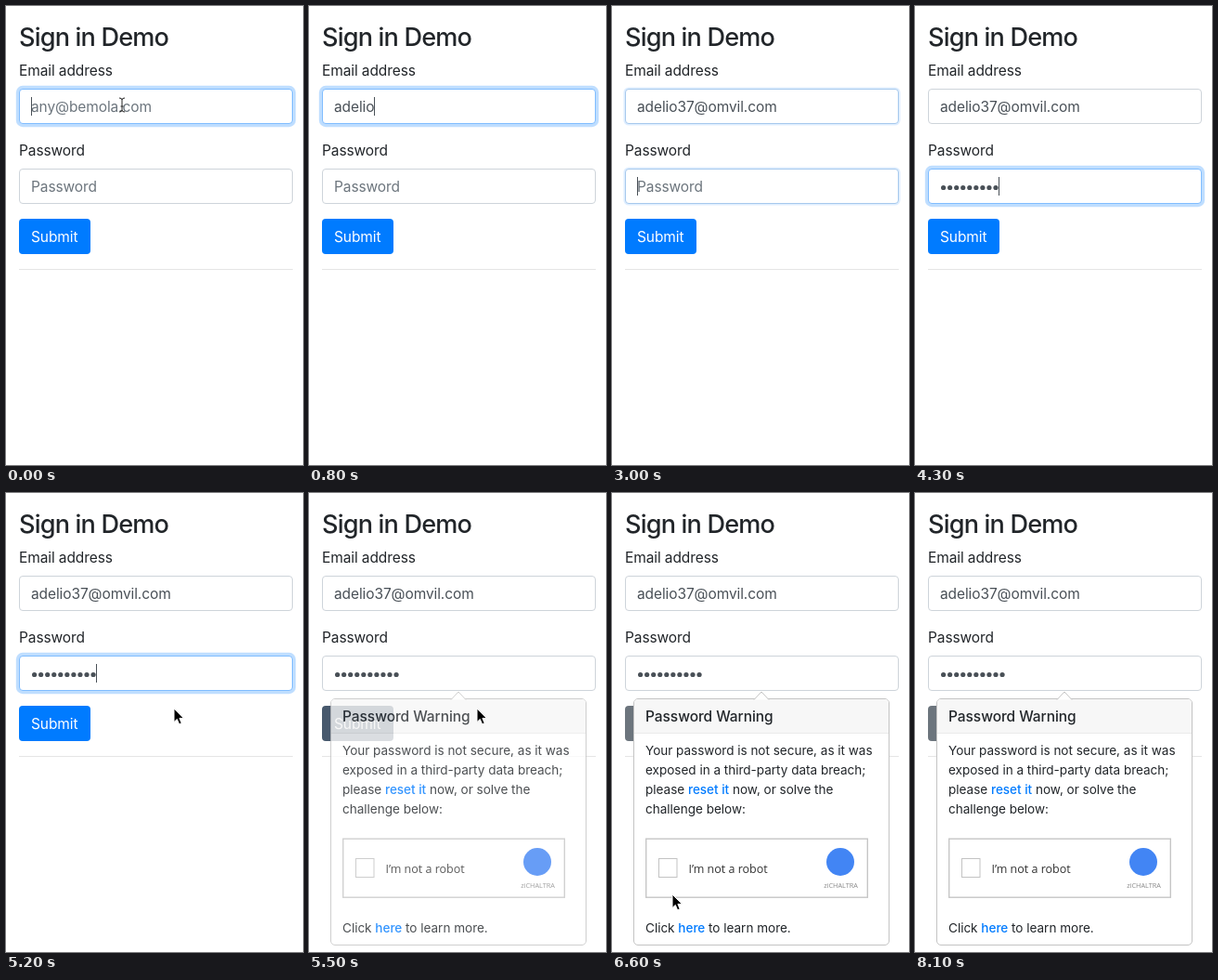
An HTML page for the animation above (8400 ms loop, 320 px wide and 494 px high).

```html
<!DOCTYPE html>
<html lang="en">
<head>
<meta charset="utf-8">
<title>Sign in Demo</title>
<style>
  html, body { margin: 0; width: 100%; height: 100%; overflow: hidden; background: #fff; }
  svg { display: block; width: 320px; height: 494px; }
  text { font: 400 15.5px Inter, "Liberation Sans", sans-serif; font-optical-sizing: none; letter-spacing: -.1px; fill: #212529; white-space: pre; }
  .head { font-size: 27.1px; font-weight: 500; letter-spacing: -.82px; }
  .title { font-weight: 500; letter-spacing: -.06px; }
  .value { fill: #495057; }
  .hint { fill: #6c757d; }
  .body { font-size: 13.56px; letter-spacing: -.02px; }
  .link { fill: #007bff; font-weight: 500; }
  .robot { font: 400 12.5px "Open Sans", "Noto Sans", sans-serif; letter-spacing: 0; fill: #333; }
  .brand { font: 400 7.3px "Open Sans", "Noto Sans", sans-serif; letter-spacing: 0; fill: #8a8a8a; }
</style>
</head>
<body>
<svg viewBox="0 0 320 494" xmlns="http://www.w3.org/2000/svg">
  <text class="head" x="14" y="43">Sign in Demo</text>
  <text x="14" y="75">Email address</text>
  <text x="14" y="161">Password</text>

  <rect id="mailRing" fill="#007bff"/>
  <rect id="mailBox" x="14.5" y="89.5" width="294" height="37" rx="3.5" fill="#fff"/>
  <text id="mail" x="27" y="114"></text>

  <rect id="passRing" fill="#007bff"/>
  <rect id="passBox" x="14.5" y="175.5" width="294" height="37" rx="3.5" fill="#fff"/>
  <text id="passHint" class="hint" x="27" y="200">Password</text>
  <g id="dots" fill="#495057"></g>
  <path id="caret" stroke="#495057"/>

  <rect id="button" x="14" y="229" width="77" height="38" rx="4"/>
  <text x="27" y="254" style="fill:#fff">Submit</text>
  <path d="M14 283.5H309" stroke="#000" stroke-opacity=".1"/>

  <g id="popover">
    <rect x="23.5" y="221.5" width="275" height="265" rx="4.5" fill="#fff" stroke="#c4c4c4"/>
    <path d="M24 258V226Q24 222 28 222H294Q298 222 298 226V258Z" fill="#f7f7f7"/>
    <path d="M24 258.5H298" stroke="#ebebeb"/>
    <path d="M153 222.5L161 214L169 222.5" fill="#fff" stroke="#c4c4c4"/>
    <text class="title" x="36" y="246">Password Warning</text>
    <text class="body" x="36" y="282">Your password is not secure, as it was</text>
    <text class="body" x="36" y="303">exposed in a third-party data breach;</text>
    <text class="body" x="36" y="324">please <tspan class="link">reset it</tspan> now, or solve the</text>
    <text class="body" x="36" y="345">challenge below:</text>
    <rect x="36.7" y="372.2" width="238.6" height="63" fill="#fff" stroke="#c6c6c6" stroke-width="1.4"/>
    <rect x="50.5" y="393.5" width="19.5" height="20" fill="#fff" stroke="#c3c3c3"/>
    <text class="robot" x="82.5" y="409">I’m not a robot</text>
    <circle cx="246" cy="397" r="15" fill="#4285f4"/>
    <text class="brand" x="246.5" y="425" text-anchor="middle">ziCHALTRA</text>
    <text class="body" x="36" y="473">Click <tspan class="link">here</tspan> to learn more.</text>
  </g>

  <path id="arrow" d="M0 0V14.5L3.3 11.4L5.6 16.8L8.2 15.7L5.9 10.4H10.4Z" fill="#000" stroke="#fff"/>
  <path id="beam" d="M-3 -7Q0 -7 0 -5Q0 -7 3 -7M0 -5V6M-3 8Q0 8 0 6Q0 8 3 8M-1.5 2H1.5" fill="none" stroke="#222"/>
</svg>
<script>
const LOOP = 8400, STEP = 100;
const ADDRESS = "adelio37@omvil.com", HINT = "any@bemola.com";

// Key press times
const mailKeys = [100, 200, 400, 500, 600, 800, 1100, 1200, 1400,
  1800, 1900, 2000, 2100, 2200, 2400, 2500, 2600, 2800];
const passKeys = [3300, 3400, 3400, 3500, 3500, 3700, 3700, 4000, 4300, 4500];

// Pointer path: time, x, y
const path = [[4900, 135, 151], [5200, 181, 232], [5600, 181, 232], [6200, 58, 399],
  [6400, 58, 404], [6500, 58, 404], [6600, 65, 432], [7100, 80, 458],
  [7300, 80, 458], [8000, 110, 440]];

const $ = id => document.getElementById(id);
const clamp = v => Math.max(0, Math.min(1, v));
const set = (id, attrs) => {
  for (const k in attrs) $(id).setAttribute(k, attrs[k]);
};
const show = (id, on) => set(id, { visibility: on ? "visible" : "hidden" });
const mix = (a, b, k) => `rgb(${a.map((v, i) => Math.round(v + (b[i] - v) * k))})`;
const typed = (keys, t) => keys.filter(k => k <= t).length;

passKeys.forEach((_, i) => {
  const dot = document.createElementNS("http://www.w3.org/2000/svg", "circle");
  dot.setAttribute("cx", 30.6 + 7.05 * i);
  dot.setAttribute("cy", 195.5);
  dot.setAttribute("r", 2.6);
  $("dots").append(dot);
});

function focus(name, y, k) {
  const s = 3.2 * k;
  set(name + "Ring", { x: 14 - s, y: y - s, width: 295 + 2 * s, height: 38 + 2 * s,
    rx: 4 + s, opacity: .25 * k });
  set(name + "Box", { stroke: mix([206, 212, 218], [128, 189, 255], k) });
}

function pointer(t) {
  if (t < 100) return [125, 106];
  if (t < path[0][0] || t > 8000) return null;
  const i = Math.max(1, path.findIndex(p => p[0] >= t));
  const [t0, x0, y0] = path[i - 1], [t1, x1, y1] = path[i];
  let k = (t - t0) / (t1 - t0);
  if (t0 === 5600) k = k * k * (3 - 2 * k);
  return [x0 + (x1 - x0) * k, y0 + (y1 - y0) * k];
}

function draw(t) {
  const chars = typed(mailKeys, t), count = typed(passKeys, t);
  const mail = $("mail");
  mail.textContent = chars ? ADDRESS.slice(0, chars) : HINT;
  mail.setAttribute("class", chars ? "value" : "hint");

  // Focus moves from one field to the other, then leaves
  const toPass = t < 3000 ? 0 : t < 3100 ? .5 : 1;
  const blur = t < 5400 ? 0 : t < 5500 ? .5 : 1;
  focus("mail", 89, 1 - toPass);
  focus("pass", 175, toPass * (1 - blur));

  show("passHint", !count);
  [...$("dots").children].forEach((d, i) =>
    d.setAttribute("visibility", i < count ? "visible" : "hidden"));

  const inPass = t >= 3000;
  const cx = inPass ? 27 + 7.05 * count : 27 + (chars ? mail.getComputedTextLength() : 0);
  set("caret", { d: `M${Math.floor(cx) + .5} ${inPass ? 184 : 98}v20` });
  show("caret", t < 4700 || (t >= 5200 && t < 5400));

  set("button", { fill: t < 5500 ? "#007bff" : t < 5600 ? "#47596d" : "#6c757d" });
  set("popover", { opacity: clamp((t - 5380) / 150) });

  const p = pointer(t);
  const overField = p && t < 5400 && ((p[1] > 89 && p[1] < 127) || (p[1] > 175 && p[1] < 213));
  show("arrow", p && !overField);
  show("beam", overField);
  if (p) set(overField ? "beam" : "arrow", { transform: `translate(${p})` });
}

const start = performance.now();
function tick() {
  const t = (performance.now() - start) % LOOP;
  draw(Math.floor(t / STEP) * STEP);
  requestAnimationFrame(tick);
}
tick();
</script>
</body>
</html>
```
